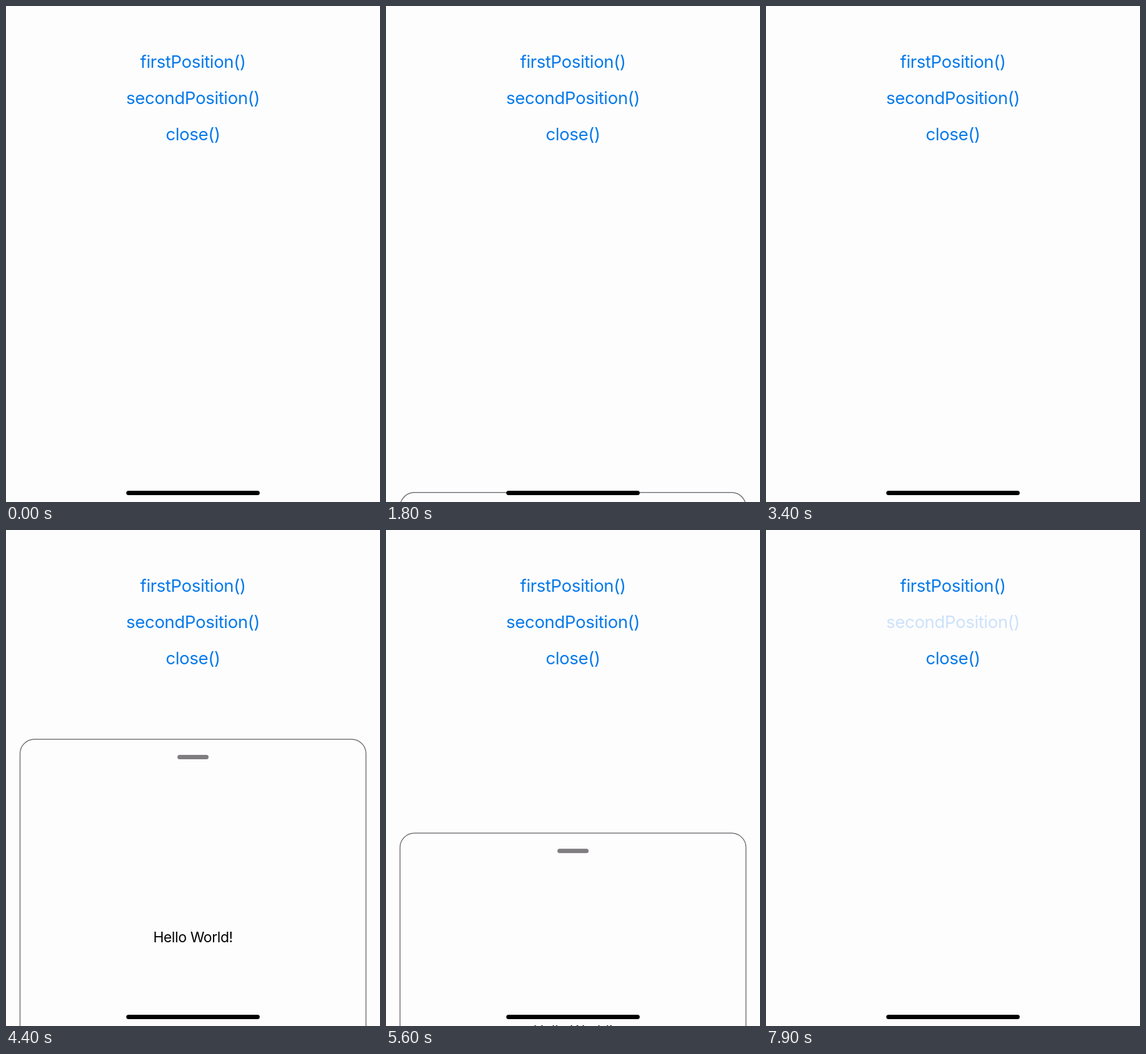
An HTML page with a canvas for the animation above (8000 ms loop, 600 by 794 pixels).

```html
<!DOCTYPE html>
<html lang="en">
<head>
<meta charset="utf-8">
<title>Bottom sheet</title>
<style>
  html, body { margin: 0; width: 100%; height: 100%; overflow: hidden; background: #fefdfe; }
  canvas { display: block; width: 600px; height: 794px; }
</style>
</head>
<body>
<canvas id="stage" width="600" height="794"></canvas>
<script>
const W = 600, H = 794, LOOP = 8000;
const ctx = document.getElementById("stage").getContext("2d");

const PAPER = "#fefdfe", BLUE = "#067aea", GREY = "#7f7d80";
const FONT = "Inter, 'Liberation Sans', sans-serif";
const CLOSED = 800, FIRST = 488, SECOND = 335;

const buttons = [
  { label: "firstPosition()", y: 98.5 },
  { label: "secondPosition()", y: 156.5 },
  { label: "close()", y: 214.5 }
];

// button index, finger down, finger up (ms)
const presses = [
  [2, 40, 450],
  [0, 940, 1520],
  [2, 2740, 3000],
  [1, 3940, 4130],
  [0, 5040, 5330],
  [2, 6040, 6380],
  [2, 7040, 7330],
  [1, 7740, 8000]
];

// start time, resting place of the sheet's top edge
const moves = [
  [1755, FIRST],
  [3040, CLOSED],
  [4150, SECOND],
  [5375, FIRST],
  [6420, CLOSED]
];
const MOVE = 250, FADE_IN = 60, FADE_OUT = 250, DIM = 0.2;

const clamp = v => Math.min(1, Math.max(0, v));
const ease = p => p < 0.5 ? 2 * p * p : 1 - 2 * (1 - p) * (1 - p);

function sheetTop(t) {
  let y = CLOSED;
  for (const [start, to] of moves) y += (to - y) * ease(clamp((t - start) / MOVE));
  return y;
}

function opacity(index, t) {
  let a = 1;
  for (const [who, down, up] of presses) {
    if (who !== index || t < down) continue;
    const dim = t < up ? clamp((t - down) / FADE_IN) : 1 - ease(clamp((t - up) / FADE_OUT));
    a = Math.min(a, 1 - (1 - DIM) * dim);
  }
  return a;
}

function text(str, y, size, color) {
  ctx.font = `400 ${size}px ${FONT}`;
  ctx.letterSpacing = "-0.4px";
  ctx.textAlign = "center";
  ctx.fillStyle = color;
  ctx.fillText(str, W / 2, y);
}

function pill(x, y, w, h, color) {
  ctx.beginPath();
  ctx.roundRect(x, y, w, h, h / 2);
  ctx.fillStyle = color;
  ctx.fill();
}

function sheet(y) {
  if (y >= CLOSED) return;
  ctx.beginPath();
  ctx.roundRect(22.5, y, 555, 640, 23);
  ctx.fillStyle = PAPER;
  ctx.fill();
  ctx.lineWidth = 1.5;
  ctx.strokeStyle = "#78767a";
  ctx.stroke();
  pill(275, y + 25, 50, 7, GREY);
  text("Hello World!", y + 325, 23, "#000");
}

function draw(t) {
  ctx.fillStyle = PAPER;
  ctx.fillRect(0, 0, W, H);
  buttons.forEach((b, i) => {
    ctx.globalAlpha = opacity(i, t);
    text(b.label, b.y, 27.7, BLUE);
  });
  ctx.globalAlpha = 1;
  sheet(sheetTop(t));
  pill(193, 776, 214, 7, "#000");
}

const origin = performance.now();
function tick() {
  draw((performance.now() - origin) % LOOP);
  requestAnimationFrame(tick);
}
tick();
</script>
</body>
</html>
```
